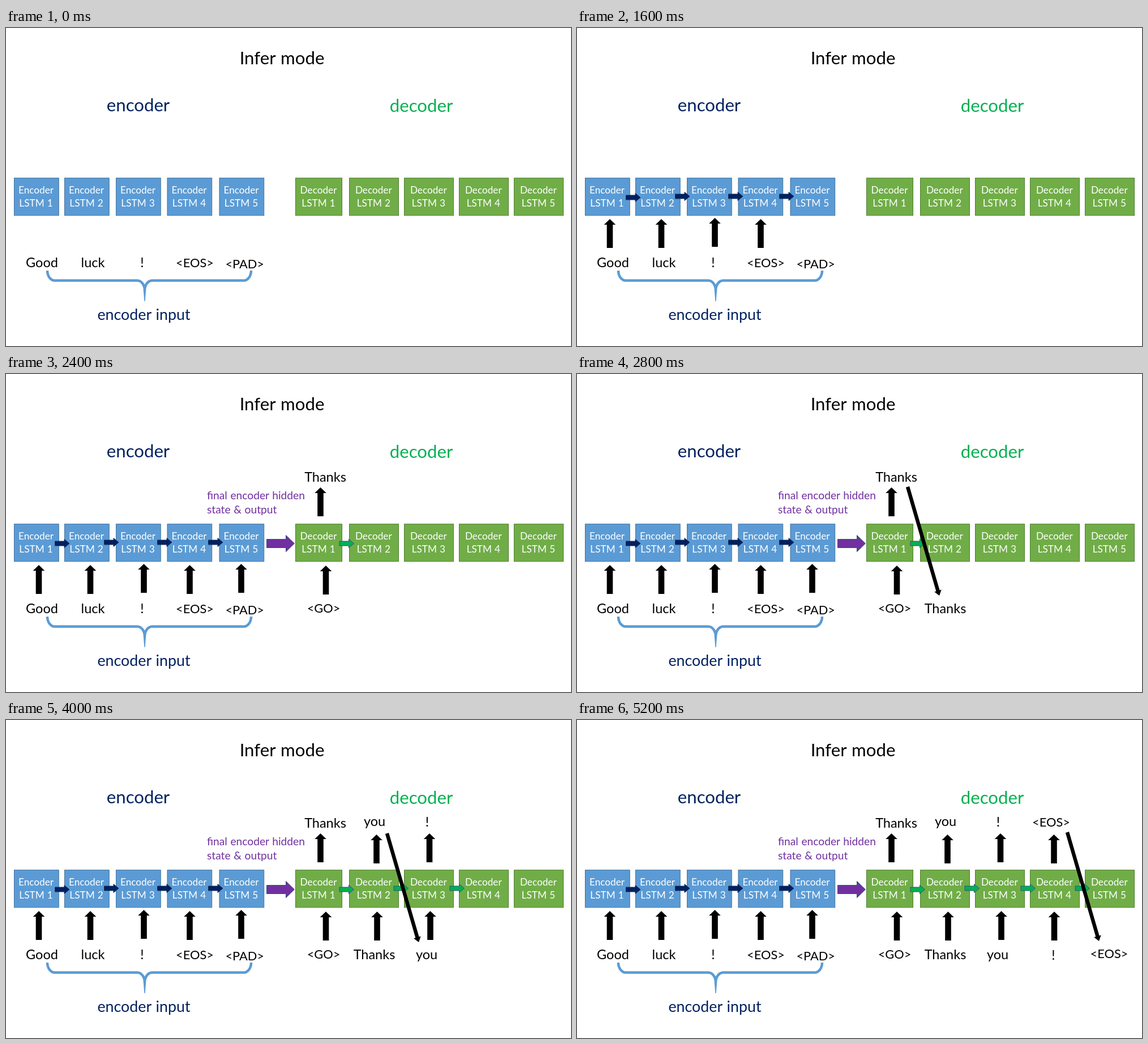
An HTML page that plays this animation: 998 px wide and 561 px high, repeating every 5.6 s.

```html
<!DOCTYPE html>
<html lang="en">
<head>
<meta charset="utf-8">
<title>Infer mode</title>
<style>
  html, body { margin: 0; width: 100%; height: 100%; overflow: hidden; background: #fff; }
  svg { display: block; width: 100vw; height: 100vh; }
  text { font-family: Lato, "Open Sans", sans-serif; word-spacing: .04em; }
</style>
</head>
<body>
<svg id="stage" viewBox="0 0 998 561"></svg>
<script>
const STEP = 400, STEPS = 14;
const NAVY = '#002060', GREEN = '#00b050', PURPLE = '#7030a0', BLUE = '#5b9bd5';
const EDGE = '#35507a';
const stage = document.getElementById('stage');
const timed = [];

// Adds an element that is visible from step `from` up to, not including, step `to`.
function add(tag, attrs, from = 0, to = STEPS) {
  const el = document.createElementNS('http://www.w3.org/2000/svg', tag);
  for (const key in attrs) el.setAttribute(key, attrs[key]);
  stage.append(el);
  if (from > 0 || to < STEPS) timed.push({ el, from, to });
  return el;
}

function label(str, x, y, size, fill = '#000', from = 0, anchor = 'middle') {
  add('text', { x, y, 'font-size': size, fill, 'text-anchor': anchor }, from).textContent = str;
}

function word(str, x, y, from) {
  label(str, x, y, str[0] === '<' ? 21.8 : 23.5, '#000', from);
}

// Block arrow starting at (x, y), drawn along `angle` degrees.
function arrow(x, y, angle, length, head, shaft, width, style, from, to) {
  const neck = length - head, s = shaft / 2, w = width / 2;
  add('path', {
    d: `M0 ${-s}H${neck}V${-w}L${length} 0L${neck} ${w}V${s}H0Z`,
    transform: `translate(${x} ${y}) rotate(${angle})`,
    ...style
  }, from, to);
}

const upArrow = (x, tip, from) =>
  arrow(x, tip + 51, -90, 51, 10, 10.6, 20.6, { fill: '#000' }, from);

const linkArrow = (x, y, fill, stroke, from) =>
  arrow(x, y, 0, 25.5, 9, 8, 15, { fill, stroke, 'stroke-width': 1 }, from);

const feedback = (x, y, from) =>
  arrow(x, y, Math.atan2(192, 56) * 180 / Math.PI, 200, 9, 6.5, 13, { fill: '#000' }, from, from + 2);

function cell(kind, n, x, width, mid, fill, stroke) {
  add('rect', { x: x + .5, y: 264.7, width, height: 66, fill, stroke });
  label(kind, mid, 292.4, 17.2, '#fff');
  label('LSTM ' + n, mid, 315, 17.2, '#fff');
}

label('Infer mode', 487.5, 64, 31.2);
label('encoder', 233.5, 146.6, 31.2, NAVY);
label('decoder', 733.5, 148, 31.2, GREEN);
label('encoder input', 243.5, 514.5, 26.8, NAVY);

[14, 103, 194, 284.5, 376.5].forEach((x, i) =>
  cell('Encoder', i + 1, x, 78.7, x + 39, BLUE, '#41719c'));
[511, 606, 703, 800, 897].forEach((x, i) =>
  cell('Decoder', i + 1, x, i ? 87 : 82, x + (i ? 43.3 : 41), '#70ad47', '#507e32'));

// Brace with a tapering tip.
add('path', {
  d: 'M73 428A13 17.5 0 0 0 86 445.5H232A13 17.5 0 0 1 245 463A13 17.5 0 0 1 258 445.5H420A13 17.5 0 0 0 433 428',
  fill: 'none', stroke: BLUE, 'stroke-width': 4.5
});
add('path', { d: 'M242.7 462L244.3 482H245.7L247.3 462Z', fill: BLUE });

// Encoder: one input word per step.
[
  ['Good', 63.5, 421.5, 58, 337],
  ['luck', 153.5, 421.5, 149, 337],
  ['!', 240.5, 421.5, 243.5, 335],
  ['<EOS>', 333.5, 421.5, 324.5, 337],
  ['<PAD>', 421.7, 423.5, 415.5, 335]
].forEach(([str, x, y, arrowX, tip], i) => {
  word(str, x, y, 0);
  upArrow(arrowX, tip, i + 1);
});
[[86.5, 299], [173.5, 297], [267.5, 297], [357.5, 297]].forEach(([x, y], i) =>
  linkArrow(x, y, NAVY, '#14305f', i + 1));

arrow(460.5, 299, 0, 49, 15, 15, 29, { fill: PURPLE, stroke: EDGE }, 5);
label('final encoder hidden', 355, 221.3, 19.2, PURPLE, 5, 'start');
label('state & output', 355, 246.3, 19.2, PURPLE, 5, 'start');

// Decoder: each output word is fed back as the next input.
const outputs = [
  ['Thanks', 564, 190, 555.5, 200],
  ['you', 651, 187, 654.5, 202],
  ['!', 744, 188, 748, 200],
  ['<EOS>', 837.5, 187.5, 842.5, 202]
];
const inputs = [[565, 338], [655.5, 338], [749.5, 337], [843, 338]];
const links = [[589, 299], [685, 297], [784, 297], [880, 297]];
const fed = [[650.5, 421.5], [743, 421.5], [841.5, 422.5], [940, 420]];
const feeds = [[584, 199], [673, 200], [768, 199], [866, 198]];

word('<GO>', 561, 420.5, 6);
outputs.forEach(([str, x, y, arrowX, tip], i) => {
  const from = 6 + 2 * i;
  upArrow(...inputs[i], from);
  upArrow(arrowX, tip, from);
  linkArrow(...links[i], GREEN, EDGE, from);
  word(str, x, y, from);
  word(str, ...fed[i], from + 1);
  feedback(...feeds[i], from + 1);
});

function render(ms) {
  const step = Math.floor(ms / STEP) % STEPS;
  for (const { el, from, to } of timed)
    el.style.display = step >= from && step < to ? '' : 'none';
}

function tick() {
  render(performance.now());
  requestAnimationFrame(tick);
}
tick();
</script>
</body>
</html>
```
